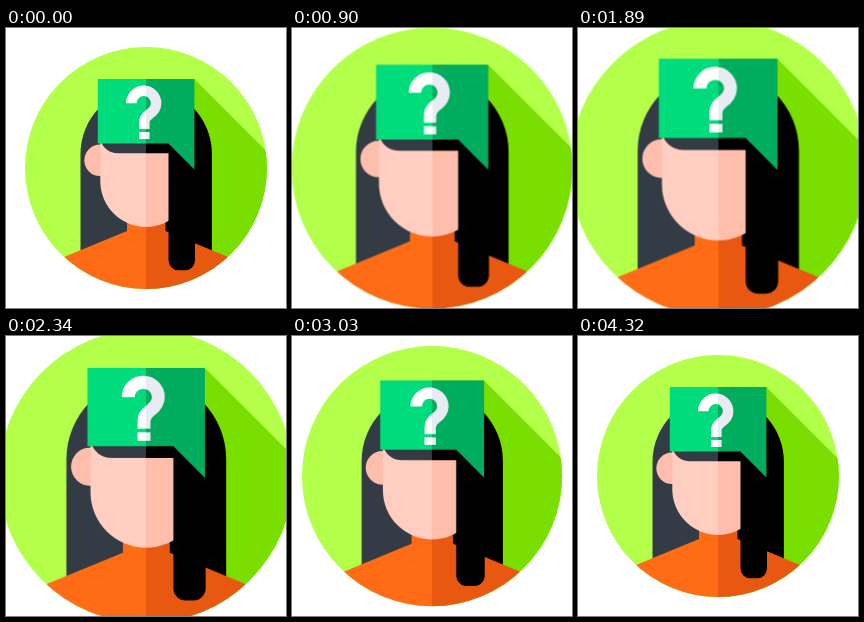
Recreate the animation shown at these times as an HTML page. Size 280x280 px, loop 4.35 s.

```html
<!DOCTYPE html>
<html lang="en">
<head>
<meta charset="utf-8">
<title>Question avatar</title>
<style>
  html, body { margin: 0; width: 100%; height: 100%; overflow: hidden; background: #fff; }
  svg { display: block; width: 100%; height: 100%; }
  #badge {
    transform-origin: 140px 140px;
    animation: pulse 4350ms ease infinite;
  }
  @keyframes pulse {
    0%, 100% { transform: scale(1); }
    50% { transform: scale(1.23); }
  }
</style>
</head>
<body>
<svg viewBox="0 0 280 280">
  <defs>
    <!-- Two-tone fills that switch at the vertical centre line -->
    <linearGradient id="split" gradientUnits="userSpaceOnUse" x1="0" x2="280" y1="0" y2="0"/>
    <linearGradient id="hair" href="#split"><stop offset=".5" stop-color="#333b44"/><stop offset=".5" stop-color="#000"/></linearGradient>
    <linearGradient id="shirt" href="#split"><stop offset=".5" stop-color="#ff6c15"/><stop offset=".5" stop-color="#e85810"/></linearGradient>
    <linearGradient id="skin" href="#split"><stop offset=".5" stop-color="#ffcec0"/><stop offset=".5" stop-color="#ffbeab"/></linearGradient>
    <linearGradient id="bubble" href="#split"><stop offset=".5" stop-color="#00dc7b"/><stop offset=".5" stop-color="#00ad5f"/></linearGradient>
    <linearGradient id="mark" href="#split"><stop offset=".5" stop-color="#fff"/><stop offset=".5" stop-color="#e8ebf2"/></linearGradient>
    <clipPath id="disc"><circle cx="140" cy="140" r="121"/></clipPath>
  </defs>

  <g id="badge">
    <g clip-path="url(#disc)">
      <rect width="280" height="280" fill="#b3ff4a"/>
      <path d="M188.3 51L280 142.7V280H140V51Z" fill="#78df00"/>
      <path d="M74.5 235V126a65.7 66 0 0 1 131.4 0V235Z" fill="url(#hair)"/>
      <path d="M58 229L121 203V185H159.500V203L222 229V270H58Z" fill="url(#shirt)"/>
    </g>
    <circle cx="94" cy="132.300" r="15.700" fill="#ffbeab"/>
    <path d="M94.300 112H185.700V153.300a45.700 45.700 0 0 1-91.400 0Z" fill="url(#skin)"/>
    <path d="M94.300 112C97 120 103 125.200 112 125.200H170V112Z" fill="url(#hair)"/>
    <path d="M162.500 110H189V232.300a10 10 0 0 1-10 10H172.500a10 10 0 0 1-10-10Z" fill="#000"/>
    <path d="M91.800 51H188.400V141.500L162.500 115.500H91.800Z" fill="url(#bubble)"/>
    <path d="M125.300 75.200a12.400 12.400 0 0 1 24.800 0c0 5-3 8.300-6.800 11-3.500 2.500-5 4.700-5 8.500v6.300"
          fill="none" stroke="url(#mark)" stroke-width="10.600"/>
    <rect x="133" y="104" width="10.600" height="7" fill="url(#mark)"/>
  </g>
</svg>
</body>
</html>
```
